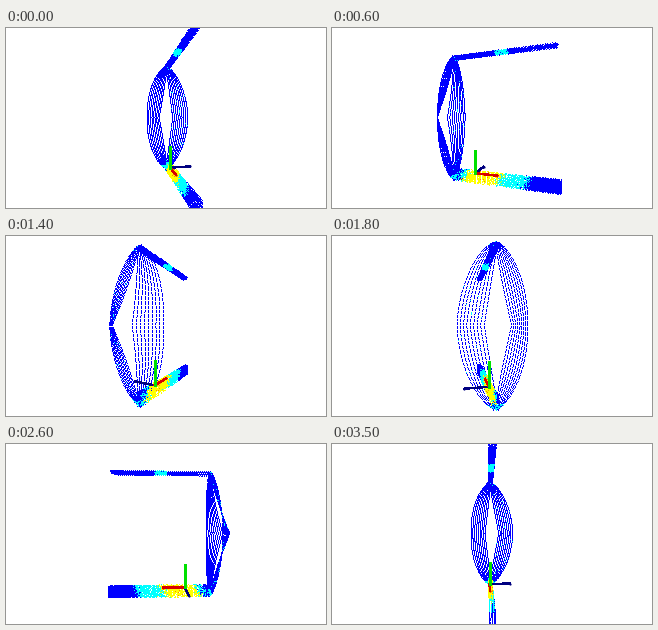
Animation of 320 by 180 pixels, one loop 3600 ms. Source, as a matplotlib script:

```python
import numpy as np
import matplotlib.pyplot as plt
from matplotlib.animation import FuncAnimation

W, H, DPI = 320, 180, 100
FRAMES, STEP = 36, 100
CX, CY, DIST = 160, 89.5, 165
BLUE, CYAN, YELLOW, ORANGE = "#0000ff", "#00ffff", "#ffff00", "#ff8000"
rng = np.random.default_rng(4)

# camera drift: frame index, sideways shift, shift towards the viewer
KEYS = np.array([[0, 8.5, 6], [6, 2, 11], [11, 2.5, -2], [18, -6.5, 1],
                 [26, 0, 0], [31, -6.5, 4.5], [35, -2, 7]])


def grid(*axes):
    return [g.ravel() for g in np.meshgrid(*axes, indexing="ij")]


def ring():
    """Bulging oval ring: nested contour lines between a hole and a rim."""
    y, u, side = grid(np.arange(-62, 62.1, 0.92), np.linspace(0, 1, 9), [-1, 1])
    q = np.abs(y) / 62
    z_in = 9 * np.clip(1 - q / 0.88, 0, 1)
    z_out = 25 * np.clip(1 - q * q, 0, 1) ** 0.7 + 0.8
    x_in = -44 - 15 * (1 - q) ** 1.4
    x_out = -43 - 3 * (1 - q * q)
    x = x_in + (x_out - x_in) * u
    z = side * (z_in + (z_out - z_in) * u) + 2.5 * (1 - q)
    noise = rng.random(y.size)
    kind = np.where((noise < 0.025) & (z > 0), 1, 0)
    kind[(y < -58) & (noise < 0.4)] = 1
    return x, y, z, kind


def top_arm():
    x, y, z = grid(np.arange(-43, 54, 2.0), np.arange(58.8, 61.6, 0.9),
                   np.arange(-2.6, 2.7, 0.65))
    x = x + 0.5 * z + 0.5 * (y - 60)
    near = np.abs(x - 6) < 6
    kind = np.where(near & (rng.random(x.size) < 0.7), 1, 0)
    return x, y, z, kind


def bottom_arm():
    x, y, z = grid(np.arange(-43, 57.5, 1.3), np.arange(-63, -51.9, 0.85),
                   [-1.8, 0, 1.8])
    x = x + 0.3 * z
    n = x.size
    soft = x + rng.normal(0, 3, n) - 0.5 * (y + 57)
    kind = np.select([soft < -36, soft < -29, soft < 4, soft < 29],
                     [0, 1, 2, 1], 0)
    kind[(np.abs(x + 12) < 6) & (rng.random(n) < 0.05)] = 3
    keep = (kind == 0) | (rng.random(n) < 0.55)
    return x[keep], y[keep], z[keep], kind[keep]


parts = [np.concatenate(p) for p in zip(ring(), top_arm(), bottom_arm())]
cloud, kinds = np.array(parts[:3]), parts[3]
clouds = [cloud[:, kinds == k] for k in range(4)]

ORIGIN = np.array([-19, -54, 0])
AXES = [(2, "#000080"), (0, "#d80000"), (1, "#00e000")]


def project(p, i):
    a = np.radians(12 + 10 * i)
    dx, dw = (np.interp(i, KEYS[:, 0], KEYS[:, c]) for c in (1, 2))
    right = p[0] * np.sin(a) + p[2] * np.cos(a) + dx
    near = p[0] * np.cos(a) - p[2] * np.sin(a) + dw
    k = DIST / (DIST - near)
    return CX + right * k, CY - p[1] * k


fig = plt.figure(figsize=(W / DPI, H / DPI), dpi=DPI, facecolor="white")
ax = fig.add_axes([0, 0, 1, 1])
ax.set(xlim=(0, W), ylim=(H, 0))
ax.axis("off")

dots = [ax.plot([], [], ",", color=c, antialiased=False)[0]
        for c in (BLUE, CYAN, YELLOW, ORANGE)]
shafts = [ax.plot([], [], color=c, lw=1.4 * 72 / DPI, antialiased=False)[0]
          for _, c in AXES]
heads = [ax.plot([], [], "o", color=c, ms=2.2 * 72 / DPI, mew=0)[0]
         for _, c in AXES]


def draw(i):
    for line, pts in zip(dots, clouds):
        x, y = project(pts, i)
        line.set_data(np.floor(x) + 0.5, np.floor(y) + 0.5)
    for (n, _), shaft, head in zip(AXES, shafts, heads):
        end = ORIGIN + 22 * np.eye(3)[n]
        x, y = project(np.array([ORIGIN, end]).T, i)
        shaft.set_data(x, y)
        head.set_data(x[1:], y[1:])
    return dots + shafts + heads


anim = FuncAnimation(fig, draw, frames=FRAMES, interval=STEP,
                     repeat=True, repeat_delay=0, blit=False)
plt.show()
```
